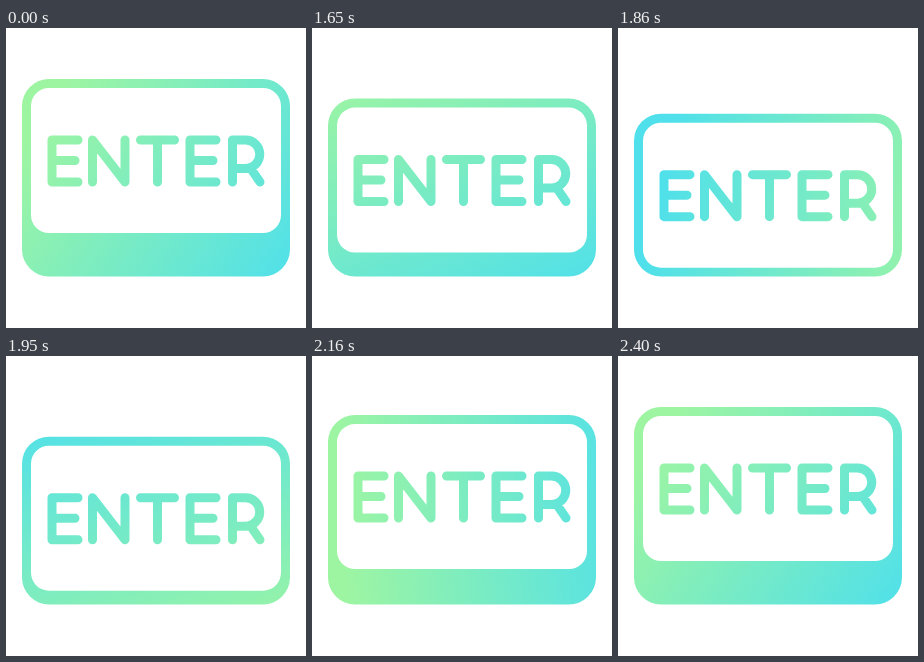
An HTML page with a canvas for the animation above (2430 ms loop, 300 by 300 pixels).

```html
<!DOCTYPE html>
<html lang="en">
<head>
<meta charset="utf-8">
<title>Enter key</title>
<style>
  html, body { margin: 0; height: 100%; overflow: hidden; background: #fff; }
  canvas { display: block; }
</style>
</head>
<body>
<canvas id="stage" width="300" height="300" role="img" aria-label="ENTER"></canvas>
<script>
const ctx = document.getElementById('stage').getContext('2d');
const LOOP = 2430, STEP = 30;
const START = 1500, PRESSED = 1830, END = 2400;
const TRAVEL = 35;

const letterE = x => `M${x + 26} 112H${x}V154H${x + 26}M${x} 132.5H${x + 23}`;
const lettering = new Path2D(
  letterE(46) +
  'M86.5 154V112L119 154V112' +
  'M134.5 112H168.5M151.5 112V154' +
  letterE(184) +
  'M226.5 154V112H239.5A14.25 14.25 0 0 1 239.5 140.5H226.5M244 139.5L254 154'
);

// Cubic Bezier easing with handles (x1, 0) and (x2, 1), solved by bisection.
function ease(u, x1, x2) {
  if (u <= 0) return 0;
  if (u >= 1) return 1;
  let lo = 0, hi = 1, s;
  for (let i = 0; i < 24; i++) {
    s = (lo + hi) / 2;
    const r = 1 - s;
    const x = 3 * x1 * s * r * r + 3 * x2 * s * s * r + s ** 3;
    if (x < u) lo = s; else hi = s;
  }
  return s * s * (3 - 2 * s);
}

const progress = (t, from, to, x2) => ease((t - from) / (to - from), 0.33, x2);

// The pivot lies right of the key's middle and slightly nearer the cyan end.
function gradientAt(degrees) {
  const cx = 186, cy = 150, back = 157, ahead = 141;
  const a = degrees * Math.PI / 180;
  const dx = Math.cos(a), dy = Math.sin(a);
  const gradient = ctx.createLinearGradient(
    cx - back * dx, cy - back * dy, cx + ahead * dx, cy + ahead * dy);
  gradient.addColorStop(0, '#9df5a2');
  gradient.addColorStop(1, '#4fe0eb');
  return gradient;
}

function draw(t) {
  const drop = TRAVEL * (progress(t, START, PRESSED, 0.46) - progress(t, PRESSED, END, 0.42));
  const paint = gradientAt(34 + 360 * progress(t, START, END, 0.5));

  ctx.fillStyle = '#fff';
  ctx.fillRect(0, 0, 300, 300);

  ctx.fillStyle = ctx.strokeStyle = paint;
  ctx.beginPath();
  ctx.roundRect(16, 51 + drop, 268, 197.5 - drop, 27);
  ctx.roundRect(25, 60 + drop, 250, 145, 18);
  ctx.fill('evenodd');

  // Move the path, not the canvas, so the gradient stays in place.
  const text = new Path2D();
  text.addPath(lettering, new DOMMatrix([1, 0, 0, 1, 0, drop]));
  ctx.lineWidth = 9;
  ctx.lineCap = ctx.lineJoin = 'round';
  ctx.stroke(text);
}

function tick() {
  const t = performance.now() % LOOP;
  draw(Math.floor(t / STEP) * STEP);
  requestAnimationFrame(tick);
}
tick();
</script>
</body>
</html>
```
